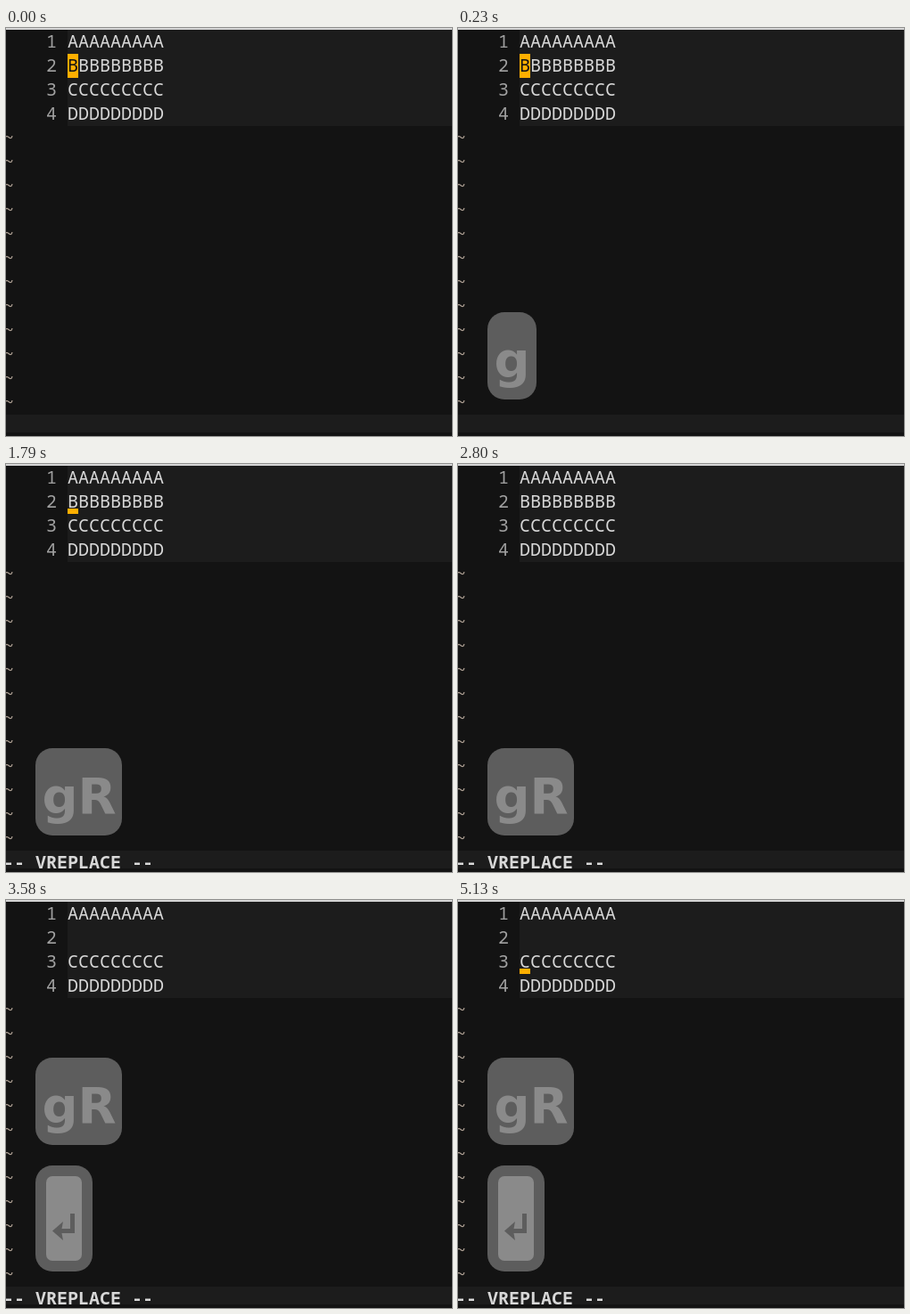
An HTML page for the animation above (5450 ms loop, 500 by 458 pixels).

```html
<!DOCTYPE html>
<html lang="en">
<head>
<meta charset="utf-8">
<title>Virtual replace mode</title>
<style>
  html, body { margin: 0; height: 100%; overflow: hidden; background: #131313; }
  svg { display: block; width: 100%; height: 100%; }
  text { font: 20px "Noto Sans Mono", monospace; fill: #d8d8d8; white-space: pre; }
  .number { fill: #a0a0a0; }
  .tilde { fill: #aea094; }
  .mode { font-weight: bold; }
  .key { fill: #5d5d5d; }
  .cap { fill: #8a8a8a; }
  text.cap { font: bold 56px "DejaVu Sans", sans-serif; }
</style>
</head>
<body>
<svg viewBox="0 0 500 458">
  <rect width="500" height="2" fill="#d4d4d4"/>
  <rect x="69" y="2" width="431" height="108" fill="#1c1c1c"/>
  <rect y="434" width="500" height="20" fill="#1c1c1c"/>
  <rect id="cursor" x="69" width="12" fill="#ffaf00"/>
  <g id="buffer"></g>
  <text id="mode" class="mode" x="-3" y="454">-- VREPLACE --</text>
  <g id="letters">
    <rect id="letterKey" class="key" x="33" y="319" height="98" rx="19"/>
    <text class="cap" x="40.5" y="392">g</text>
    <text id="capitalR" class="cap" x="80.5" y="392">R</text>
  </g>
  <g id="enter">
    <rect class="key" x="33" y="298" width="64" height="119" rx="19"/>
    <rect class="cap" x="45" y="310" width="40" height="95" rx="7"/>
    <path class="key" d="M52 371.5L64 361L62.5 369H72V352H77V374H62.5L64 382Z"/>
  </g>
</svg>
<script>
const LOOP = 5450, ROW = 27, TOP = 2;
const PRESS_G = 230, PRESS_R = 860, HIDE = 2800, PRESS_ENTER = 2890;
// The cursor is hidden during these spans of time.
const BLINKS = [[80, 230], [1560, 1790], [2190, 2420], [HIDE, PRESS_ENTER],
                [3580, 3810], [4270, 4500], [4900, 5130]];

const $ = id => document.getElementById(id);
const show = (id, visible) => $(id).setAttribute("visibility", visible ? "visible" : "hidden");

function addText(x, row, content, className) {
  const node = document.createElementNS("http://www.w3.org/2000/svg", "text");
  node.setAttribute("x", x);
  node.setAttribute("y", TOP + row * ROW + 20);
  node.setAttribute("class", className);
  node.textContent = content;
  return $("buffer").appendChild(node);
}

const lines = [..."ABCD"].map((letter, row) => {
  addText(45, row, row + 1, "number");
  return addText(69, row, letter.repeat(9), "line");
});
for (let row = 4; row < 16; row++) addText(-3, row, "~", "tilde");

// First letter of the second line, dark while the block cursor covers it.
lines[1].innerHTML = "<tspan>B</tspan>BBBBBBBB";
const coveredLetter = lines[1].firstChild;

function draw(now) {
  const t = now % LOOP;
  const replacing = t >= PRESS_R;
  const entered = t >= PRESS_ENTER;
  const cursorOn = !BLINKS.some(([from, to]) => t >= from && t < to);
  const rowTop = TOP + ROW * (entered ? 2 : 1);

  $("cursor").setAttribute("y", rowTop + (replacing ? 21 : 0));
  $("cursor").setAttribute("height", replacing ? 6 : ROW);
  show("cursor", cursorOn);
  coveredLetter.style.fill = cursorOn && !replacing ? "#131313" : "";
  lines[1].style.display = entered ? "none" : "";

  show("mode", replacing);
  $("letters").style.display = t >= PRESS_G ? "" : "none";
  $("letters").setAttribute("transform", `translate(0 ${entered ? -142 : 0})`);
  $("letterKey").setAttribute("width", replacing ? 97 : 55);
  show("capitalR", replacing);
  show("enter", entered);
}

const start = performance.now();
function tick() {
  draw(performance.now() - start);
  requestAnimationFrame(tick);
}
tick();
</script>
</body>
</html>
```
